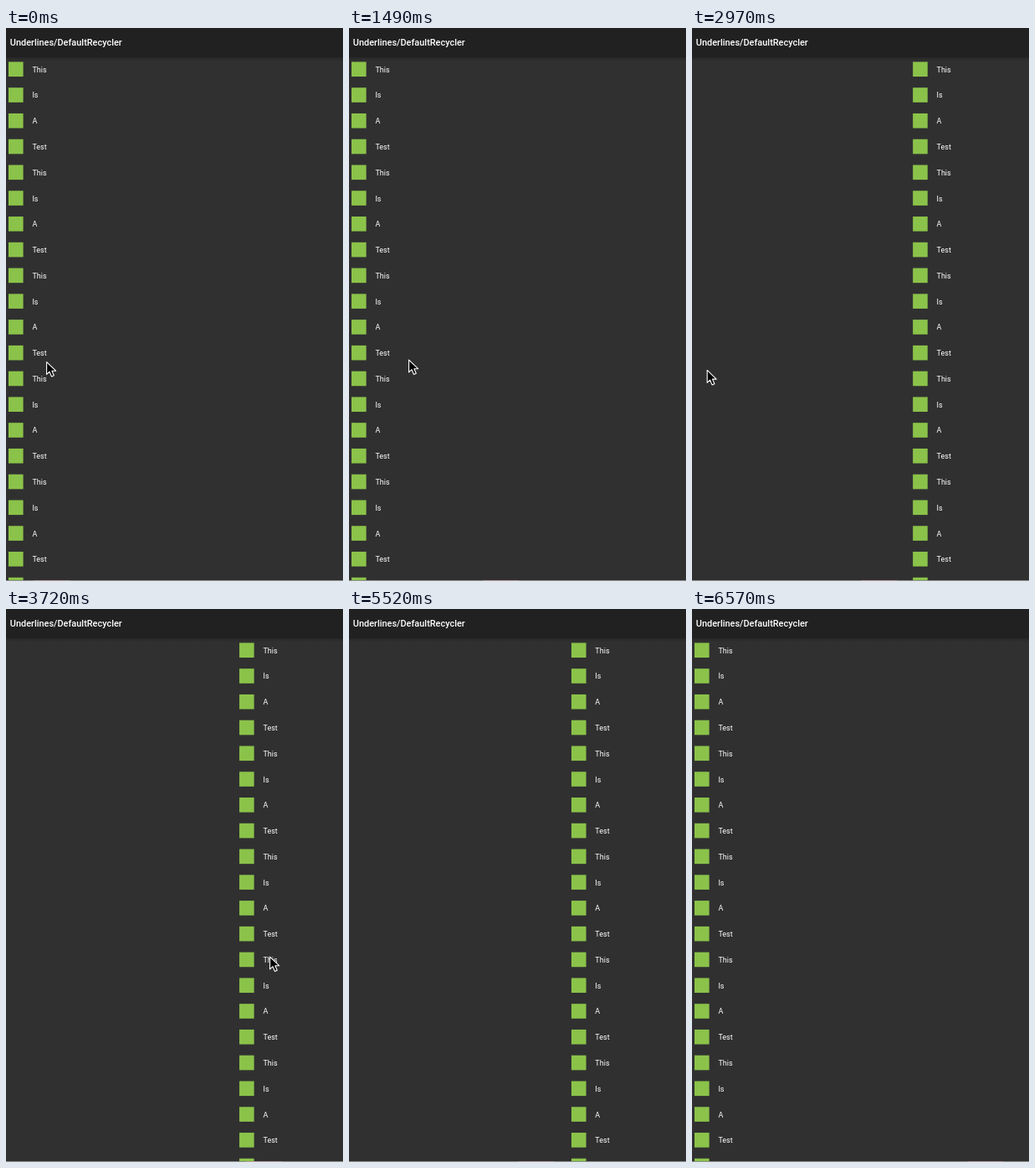
An HTML page for the animation above (7.39 s loop, 403x660 px).

```html
<!DOCTYPE html>
<html lang="en">
<head>
<meta charset="utf-8">
<title>Pager with underline tabs</title>
<style>
  html, body { margin: 0; width: 100%; height: 100%; overflow: hidden; background: #303030; }
  svg { display: block; width: 403px; height: 660px; }
  text { fill: #fff; font-family: Roboto, "Liberation Sans", sans-serif; }
  .row { font-size: 9px; }
  .title { font-size: 10.95px; font-weight: 500; }
</style>
</head>
<body>
<svg viewBox="0 0 403 660">
  <defs>
    <linearGradient id="shade" x1="0" y1="0" x2="0" y2="1">
      <stop offset="0" stop-color="#000" stop-opacity=".2"/>
      <stop offset="1" stop-color="#000" stop-opacity="0"/>
    </linearGradient>
  </defs>
  <rect width="403" height="660" fill="#303030"/>
  <g id="pages"></g>
  <rect y="35" width="403" height="4" fill="url(#shade)"/>
  <rect width="403" height="35" fill="#212121"/>
  <text class="title" x="4.8" y="21">Underlines/DefaultRecycler</text>
  <rect y="659" width="403" height="1" fill="#8e8e8e"/>
  <rect id="tab" y="659" width="43" height="1" fill="#b39a9e"/>
  <path id="cursor" d="M.6 .6V15.4L4 12.2L6.5 18L9.3 16.8L6.9 11.2H11.6Z"
        fill="#000" stroke="#fff" stroke-width="1.1" stroke-linejoin="round"/>
</svg>
<script>
const LOOP = 7390, LAST = 44, STEP = 6570 / LAST, LEAD = 14;
const PAGE_W = 403, ROW_H = 30.77, ROWS = 21, PAGES = 8;
const WORDS = ["This", "Is", "A", "Test"];

// Page changes; start and length are counted in steps
const MOVES = [
  { start: 0, length: 3, to: 1 },
  { start: 3, length: 3, to: 2 },
  { start: 7, length: 3, to: 3 },
  { start: 14.957, length: 3, to: 4 },
  { start: 18, length: 2.5, to: 5 },
  { start: 20.5, length: 2.5, to: 6 },
  { start: 23.122, length: 3, to: 5 },
  { start: 29.71, length: 3, to: 4 },
  { start: 35.117, length: 8.88, to: 7 }
];

// Pointer turning points: [step, x, y]; it leaves the stage after the last
const POINTER = [
  [0, 48, 398], [10, 71, 395.5], [14, 115, 398], [16, 3, 406.5],
  [23, 40, 410], [25, 315, 414.5], [28, 120, 405], [32, 292, 401]
];

const $ = id => document.getElementById(id);

function add(parent, tag, attrs, text = "") {
  const el = document.createElementNS("http://www.w3.org/2000/svg", tag);
  for (const key in attrs) el.setAttribute(key, attrs[key]);
  el.textContent = text;
  return parent.appendChild(el);
}

function buildPage() {
  const page = add($("pages"), "g", {});
  for (let r = 0; r < ROWS; r++) {
    const y = r * ROW_H;
    add(page, "rect", { x: 3, y: 40.4 + y, width: 17.6, height: 17.6, fill: "#8bc34a" });
    add(page, "text", { class: "row", x: 31.4, y: 52.7 + y }, WORDS[r % WORDS.length]);
  }
  return page;
}

const pages = Array.from({ length: PAGES }, buildPage);

const mix = (a, b, t) => a + (b - a) * t;

function ease(t) {
  const u = Math.min(1, Math.max(0, t));
  return u * u * (3 - 2 * u);
}

// Scroll position in pages, and the tab of the last finished move
function pagerAt(step) {
  let pos = 0, tab = 0;
  for (const { start, length, to } of MOVES) {
    const t = (step - start) / length;
    pos = mix(pos, to, ease(t));
    if (t >= 1) tab = to;
  }
  return { pos, tab };
}

function pointerAt(step) {
  const n = POINTER.findIndex(key => key[0] >= step);
  if (n < 0) return null;
  const b = POINTER[n], a = POINTER[Math.max(0, n - 1)];
  const t = ease((step - a[0]) / (b[0] - a[0] || 1));
  return [mix(a[1], b[1], t), mix(a[2], b[2], t)];
}

function draw(time) {
  const step = Math.min(LAST, Math.floor((time + LEAD) / STEP));
  const { pos, tab } = pagerAt(step);
  pages.forEach((page, n) => {
    const x = (n - pos) * PAGE_W;
    page.setAttribute("transform", `translate(${x.toFixed(2)} 0)`);
    page.setAttribute("display", Math.abs(x) < PAGE_W ? "inline" : "none");
  });
  $("tab").setAttribute("x", 33.5 + 42.25 * tab);

  const point = pointerAt(step);
  $("cursor").setAttribute("display", point ? "inline" : "none");
  if (point) $("cursor").setAttribute("transform", `translate(${point})`);
}

const start = performance.now();
function tick() {
  draw((performance.now() - start) % LOOP);
  requestAnimationFrame(tick);
}
tick();
</script>
</body>
</html>
```
